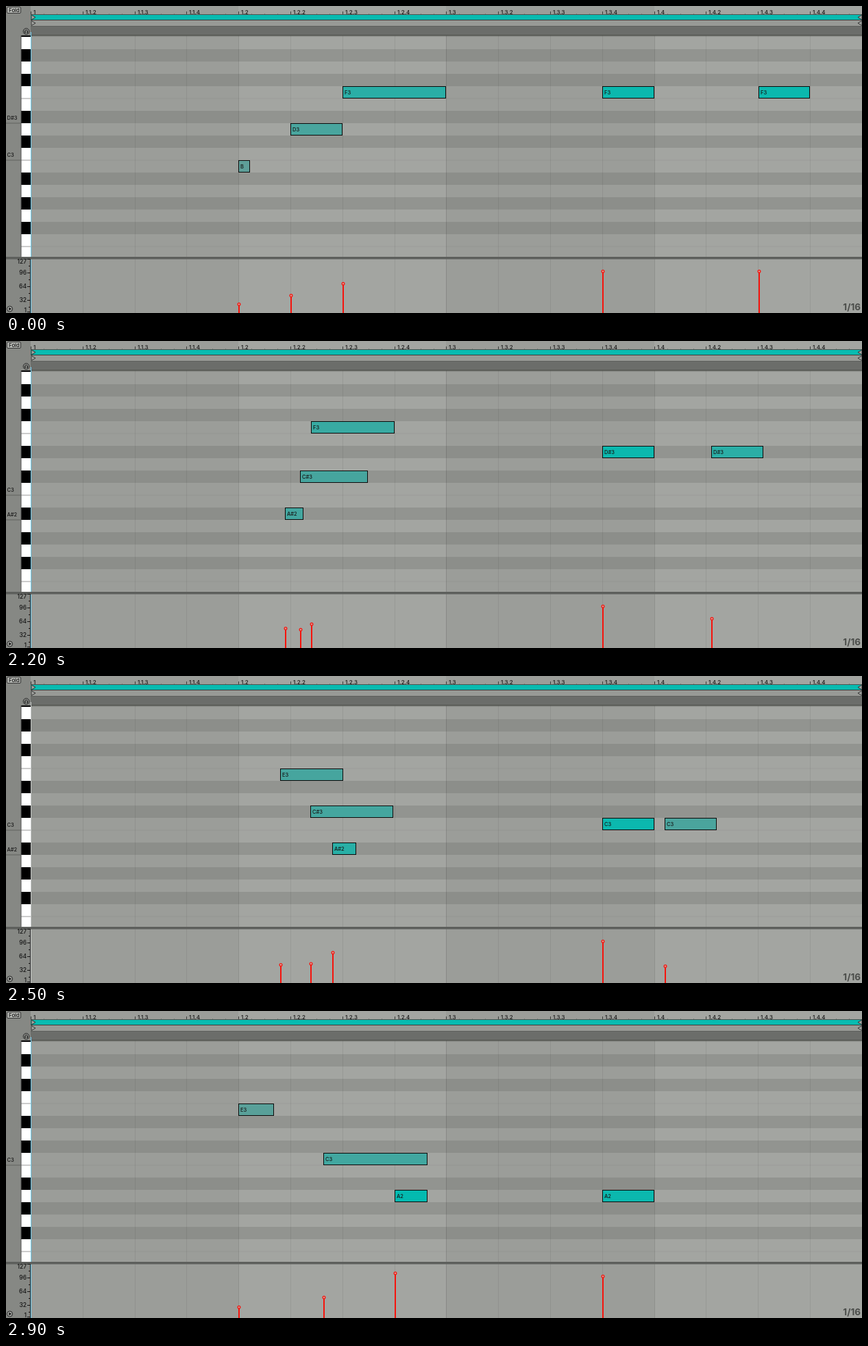
An HTML page with a canvas that plays this animation: 1249 px wide and 448 px high, repeating every 5900 ms.

```html
<!DOCTYPE html>
<html>
<head>
<meta charset="utf-8">
<style>
html, body { margin: 0; width: 100%; height: 100%; overflow: hidden; background: #868884; }
canvas { display: block; }
</style>
</head>
<body>
<canvas id="stage" width="1249" height="448"></canvas>
<script>
const g = document.getElementById('stage').getContext('2d');
const W = 1249, H = 448, LEFT = 36, STEP = 75.8;
const NAMES = ['C', 'C#', 'D', 'D#', 'E', 'F', 'F#', 'G', 'G#', 'A', 'A#', 'B'];
const INK = '#161616';

// Start value and change per step: x, width, pitch, top of the velocity stem
const NOTES = [
  { x: [339.2, 22.74], w: [16.8, 3.17], p: [59, -.2], v: [435.2, -5.25] },
  { x: [415, 4.83], w: [75.8, 7.55], p: [62, -.2], v: [422.6, -.45] },
  { x: [490.7, -15.15], w: [151.5, -9.95], p: [65, -.1], v: [405.2, 2.7] },
  { x: [870, 0], w: [75.8, 0], p: [65, -.8], v: [387.2, 0] },
  { x: [1097.6, -22.74], w: [75.8, 0], p: [65, -.8], v: [387.2, 6.05] }
];
// Second key label at each step
const KEY_MARKS = [63, 61, 61, 58, 58, 58, 58, 58, 57, 57, 0];

const isBlack = p => NAMES[p % 12].length > 1;
const pitchName = p => NAMES[p % 12] + (Math.floor(p / 12) - 2);
const rowTop = p => 117 + 18 * (65 - p);
const at = ([start, rate], k) => start + rate * k;

function rect(x, y, w, h, color) {
  g.fillStyle = color;
  g.fillRect(x, y, w, h);
}

function text(s, x, y, size = 8, align = 'left', color = INK, weight = 500) {
  g.font = `${weight} ${size}px Inter, sans-serif`;
  g.textAlign = align;
  g.textBaseline = 'alphabetic';
  g.fillStyle = color;
  g.fillText(s, x, y);
}

function poly(points, fill, stroke) {
  g.beginPath();
  points.forEach(([x, y]) => g.lineTo(x, y));
  g.closePath();
  if (fill) { g.fillStyle = fill; g.fill(); }
  if (stroke) { g.strokeStyle = stroke; g.lineWidth = 1; g.stroke(); }
}

function ring(x, y, r, fill, stroke, line = 1) {
  g.beginPath();
  g.arc(x, y, r, 0, 7);
  g.fillStyle = fill;
  g.fill();
  g.strokeStyle = stroke;
  g.lineWidth = line;
  g.stroke();
}

function grid() {
  for (let b = 0; b < 4; b++) {
    const x = Math.round(LEFT + 4 * STEP * b), w = 304, dark = b % 2 === 0;
    rect(x, 0, w, H, dark ? '#9b9d99' : '#a3a5a1');
    for (let p = 52; p <= 70; p++) {
      if (isBlack(p)) rect(x, Math.max(43, rowTop(p)), w, p === 70 ? 2 : 18, dark ? '#8c8e8a' : '#929490');
    }
  }
  for (const p of [65, 60, 53]) rect(LEFT, rowTop(p) + 17.5, W, 1, 'rgba(0,0,0,.06)');
  for (let i = 1; i < 16; i++) {
    rect(Math.round(LEFT + STEP * i), 43, 1, H, i % 4 ? 'rgba(0,0,0,.07)' : 'rgba(0,0,0,.12)');
  }
}

function ruler() {
  for (let i = 0; i < 16; i++) {
    const x = Math.round(LEFT + STEP * i), beat = Math.floor(i / 4) + 1, part = i % 4 + 1;
    const label = part > 1 ? `1.${beat}.${part}` : beat > 1 ? `1.${beat}` : '1';
    rect(x, 8, 1, 5, '#3c3d3b');
    for (let j = 1; j < 4; j++) rect(Math.round(x + STEP * j / 4), 11, 1, 2, '#777975');
    text(label, x + 4, 12);
  }
  rect(LEFT, 12, W, 1, '#50524f');
  rect(LEFT, 13, W, 7, '#08bbb0');
  rect(LEFT, 20, W, 1, '#3c3e3b');
  rect(LEFT, 21, W, 8, '#989a96');
  rect(LEFT, 29, W, 13, '#6b6d6a');
  rect(LEFT, 29, W, 1, '#5d5f5c');
  rect(LEFT, 42, W, 1.5, '#52544f');
  for (const y of [16.5, 25]) {
    poly([[37, y - 3.5], [43, y], [37, y + 3.5]], '#a3a5a1', '#333');
    poly([[1249, y - 3.5], [1243, y], [1249, y + 3.5]], '#a3a5a1', '#333');
  }
}

function sidebar(mark) {
  rect(0, 0, LEFT, H, '#868884');
  rect(22, 43, 14, 323, '#fff');
  for (let p = 52; p <= 70; p++) {
    if (isBlack(p)) rect(22, Math.max(43, rowTop(p)), 14, p === 70 ? 2 : 18, '#000');
  }
  for (const p of [65, 60, 53]) rect(22, rowTop(p) + 17.5, 14, 1, '#999');
  rect(21.5, 43, 1, 323, '#555');
  for (const p of [60, mark]) {
    if (!p) continue;
    text(pitchName(p), 1.5, rowTop(p) + 12.5, 7.5);
    rect(0, rowTop(p) + 17.5, 22, 1, '#626460');
  }

  g.fillStyle = '#b3b5b1';
  g.strokeStyle = '#333';
  g.lineWidth = 1;
  g.beginPath();
  g.roundRect(1.5, 1.5, 20, 9, 1.5);
  g.fill();
  g.stroke();
  text('Fold', 12, 9, 7.8, 'center');

  // Headphones
  ring(29.5, 37, 4.3, '#8f918d', '#222');
  g.beginPath();
  g.arc(29.5, 37, 2, Math.PI, 0);
  g.stroke();
  rect(27, 37, 1.5, 2.5, INK);
  rect(30.5, 37, 1.5, 2.5, INK);
}

function velocityAxis() {
  rect(0, 366, W, 3.5, '#5d5f5c');
  for (let i = 0; i < 9; i++) {
    const len = i % 2 ? 2 : 4;
    rect(35 - len, i < 8 ? 369 + i * 10 : 446, len, 1, INK);
  }
  rect(35, 369, 1, 79, '#222');
  [[127, 376], [96, 392], [64, 412], [32, 432], [1, 447]].forEach(([n, y]) => text(n, 30, y, 8.5, 'right'));
  ring(5.5, 442, 4, '#a0a29e', '#222');
  poly([[4.3, 439.8], [8, 442], [4.3, 444.2]], '#111');
}

function drawNote(note, k) {
  const x = at(note.x, k), w = at(note.w, k), y = at(note.v, k);
  const pitch = Math.round(at(note.p, k)), top = rowTop(pitch);
  const left = Math.round(x), right = Math.round(x + w);
  const soft = (y - 383) / 52;
  const mix = (a, b) => Math.round(a + (b - a) * soft);
  rect(left, top, right - left, 18, '#0a0a0a');
  rect(left + 1, top + 1, right - left - 2, 16, `rgb(${mix(4, 94)},${mix(186, 158)},${mix(176, 152)})`);
  const label = pitchName(pitch);
  text(w < 18 ? label[0] : label, left + 3, top + 12, 7.5);

  rect(left, y, 2, H - y, '#f5130c');
  ring(left + 1, y, 1.9, '#d99a94', '#f5130c', 1.2);
}

function draw(now) {
  const t = now % 5900;
  const k = Math.max(0, Math.min(10, Math.floor(t / 100) - 19));
  g.clearRect(0, 0, W, H);
  grid();
  ruler();
  sidebar(KEY_MARKS[k]);
  velocityAxis();
  // Blinking insert cursor
  const cursor = k > 5 && k < 10 ? '#c6cac8' : '#6fcdf0';
  rect(36, 38, 1, 328, cursor);
  rect(36, 370, 1, 78, cursor);
  text('1/16', 1247, 444, 13.5, 'right', '#4b4d4a', 700);
  // The last note is swallowed once it starts inside its neighbour
  NOTES.forEach((note, i) => {
    if (i < 4 || at(note.x, k) > 946) drawNote(note, k);
  });
}

const start = performance.now();
function tick() {
  draw(performance.now() - start);
  requestAnimationFrame(tick);
}
tick();
</script>
</body>
</html>
```
